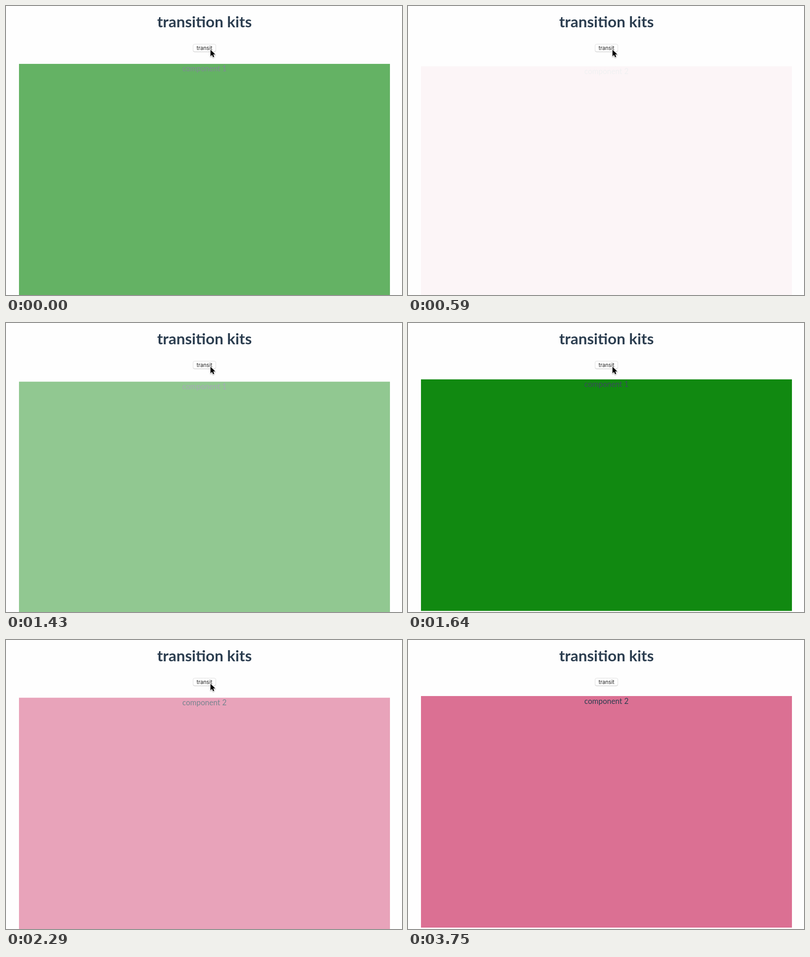
An HTML page with a canvas for the animation above (4330 ms loop, 854x624 px).

```html
<!DOCTYPE html>
<html lang="en">
<head>
<meta charset="utf-8">
<title>transition kits</title>
<style>
  html, body { margin: 0; width: 100%; height: 100%; overflow: hidden; background: #fefefe; }
  canvas { display: block; }
</style>
</head>
<body>
<canvas id="stage" width="854" height="624"></canvas>
<script>
const ctx = document.getElementById('stage').getContext('2d');
const LOOP = 4330;
const CENTER = 428;
const PAPER = [254, 254, 254];
const INK = [44, 62, 80];

// The picture holds between these moments.
const TICKS = [
  0, 90, 190, 290, 590, 710, 800, 890, 1010, 1430, 1520, 1640, 1760,
  2080, 2200, 2290, 2410, 2530, 2650, 2740, 2830,
  3100, 3180, 3260, 3340, 3420, 3500, 3580, 3670, 3750
];

const GREEN = { label: 'component 1', color: [0, 128, 0] };
const PINK = { label: 'component 2', color: [219, 112, 147] };
const SWAPS = [
  { start: -175, panel: GREEN },
  { start: 550, panel: PINK },
  { start: 1300, panel: GREEN },
  { start: 2105, panel: PINK }
];
const FADE = 500;
const SLIDE = 10;

const POINTER_PATH = [
  { t: 2410, x: 440, y: 93 },
  { t: 2530, x: 447, y: 108 },
  { t: 2650, x: 570, y: 236 },
  { t: 2740, x: 698, y: 372 },
  { t: 2830, x: 752, y: 426 },
  { t: 3020, x: 752, y: 426 },
  { t: 3260, x: 783, y: 507 },
  { t: 3580, x: 828, y: 613 },
  { t: 3670, x: 828, y: 616 }
];
const POINTER_GONE = 3750;

const lerp = (a, b, k) => a + (b - a) * k;
const rgb = c => `rgb(${c.map(Math.round).join(',')})`;
const mix = (a, b, k) => rgb(a.map((v, i) => lerp(v, b[i], k)));
const bezier = (a, b, s) => 3 * a * s * (1 - s) ** 2 + 3 * b * s * s * (1 - s) + s ** 3;

// CSS "ease": cubic-bezier(.25, .1, .25, 1)
function ease(x) {
  if (x <= 0) return 0;
  if (x >= 1) return 1;
  let low = 0, high = 1;
  for (let i = 0; i < 24; i++) {
    const mid = (low + high) / 2;
    if (bezier(0.25, 0.25, mid) < x) low = mid; else high = mid;
  }
  return bezier(0.1, 1, low);
}

function text(label, y, font, color) {
  ctx.font = font;
  ctx.fillStyle = color;
  ctx.textAlign = 'center';
  ctx.fillText(label, CENTER, y);
}

function drawButton(pressed) {
  ctx.beginPath();
  if (pressed) {
    const blue = ctx.createLinearGradient(0, 82, 0, 99);
    blue.addColorStop(0, '#4c97fd');
    blue.addColorStop(1, '#0a59ee');
    ctx.fillStyle = blue;
    ctx.roundRect(403.5, 82, 49, 17, 3.5);
    ctx.fill();
  } else {
    ctx.fillStyle = '#c6c6c6';
    ctx.roundRect(403.2, 82.5, 49.6, 17, 4);
    ctx.fill();
    ctx.beginPath();
    ctx.fillStyle = '#fff';
    ctx.strokeStyle = '#dedede';
    ctx.lineWidth = 0.8;
    ctx.roundRect(403.5, 82.4, 49, 16.2, 3.5);
    ctx.fill();
    ctx.stroke();
  }
  text('transit', 95, '11.5px Inter, sans-serif', pressed ? '#0a1430' : '#222');
}

function drawPanel(t) {
  const swap = SWAPS.filter(s => s.start <= t).pop();
  const { label, color } = swap.panel;
  const opacity = ease((t - swap.start) / FADE);
  const y = 121 + SLIDE * (1 - opacity);
  ctx.fillStyle = mix(PAPER, color, opacity);
  ctx.fillRect(28, y, 800, 500);
  text(label, y + 16.5, '16.4px Lato, sans-serif', mix(PAPER, INK, opacity));
}

function pointerAt(t) {
  const next = POINTER_PATH.findIndex(p => p.t >= t);
  if (next === 0) return POINTER_PATH[0];
  if (next < 0) return POINTER_PATH[POINTER_PATH.length - 1];
  const a = POINTER_PATH[next - 1], b = POINTER_PATH[next];
  const k = (t - a.t) / (b.t - a.t);
  return { x: lerp(a.x, b.x, k), y: lerp(a.y, b.y, k) };
}

function drawPointer(t) {
  if (t >= POINTER_GONE) return;
  const { x, y } = pointerAt(t);
  const arrow = new Path2D('M1 1.5V15.6L4.3 12.5L6.5 17.6L9 16.5L6.9 11.6H11.4Z');
  ctx.save();
  ctx.translate(x, y);
  ctx.lineJoin = 'round';
  ctx.strokeStyle = '#fff';
  ctx.lineWidth = 2;
  ctx.shadowColor = 'rgba(0,0,0,.35)';
  ctx.shadowBlur = 2;
  ctx.shadowOffsetY = 1;
  ctx.stroke(arrow);
  ctx.shadowColor = 'transparent';
  ctx.fillStyle = '#000';
  ctx.fill(arrow);
  ctx.restore();
}

function render(now) {
  const time = now % LOOP;
  const t = TICKS.filter(tick => tick <= time).pop();
  ctx.fillStyle = rgb(PAPER);
  ctx.fillRect(0, 0, 854, 624);
  text('transition kits', 46, 'bold 33.3px Lato, sans-serif', rgb(INK));
  drawButton(t === 2080);
  drawPanel(t);
  drawPointer(t);
}

const begin = performance.now();
function loop() {
  render(performance.now() - begin);
  requestAnimationFrame(loop);
}
loop();
</script>
</body>
</html>
```
